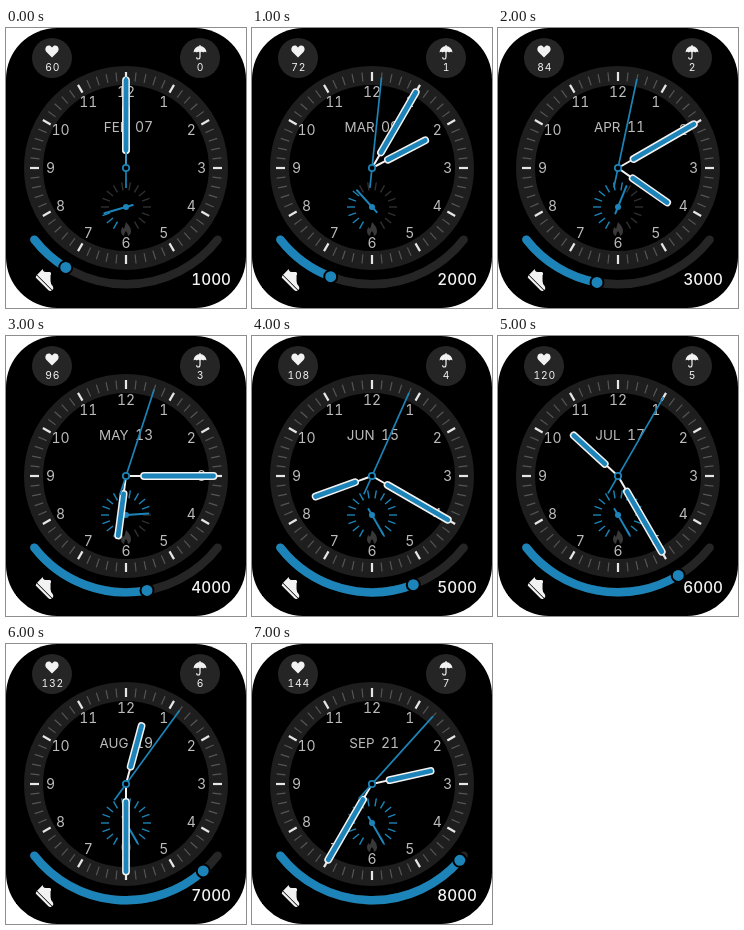
Animation of 240 by 280 pixels, one loop 8 s. Source, as an HTML page:

```html
<!DOCTYPE html>
<html lang="en">
<head>
<meta charset="utf-8">
<title>Watch face</title>
<style>
  html, body { margin: 0; width: 100%; height: 100%; overflow: hidden; background: #fff; }
  svg { display: block; width: 100vw; height: 100vh; }
  text { font-family: Inter, Roboto, sans-serif; font-variant-numeric: tabular-nums; }
  .mid { text-anchor: middle; }
  .end { text-anchor: end; }
  .bold { font-weight: 500; }
  .round { stroke-linecap: round; }
</style>
</head>
<body>
<svg id="face" viewBox="0 0 240 280"></svg>
<script>
const BLUE = '#1c84b8', GREY = '#252525', LIGHT = '#f2f2f2', TEXT = '#bcbcbc';
const MONTHS = ['FEB', 'MAR', 'APR', 'MAY', 'JUN', 'JUL', 'AUG', 'SEP'];
const STEP = 1000, CX = 120, CY = 140, SUB_Y = 179, ARC_R = 116.3;
const TICK_GAP = 20;
const face = document.getElementById('face');

function add(tag, attrs, parent = face) {
  const el = document.createElementNS('http://www.w3.org/2000/svg', tag);
  for (const name in attrs) el.setAttribute(name, attrs[name]);
  parent.appendChild(el);
  return el;
}

function label(x, y, size, fill, cls, content = '') {
  const el = add('text', { x, y, 'font-size': size, fill, class: cls });
  el.textContent = content;
  return el;
}

// Clockwise angle in degrees, zero at twelve o'clock
function polar(angle, r, cy = CY) {
  const a = angle * Math.PI / 180;
  return [CX + r * Math.sin(a), cy - r * Math.cos(a)];
}

function spoke(angle, from, to, cy, stroke, width, parent = face) {
  const [x1, y1] = polar(angle, from, cy), [x2, y2] = polar(angle, to, cy);
  return add('line', { x1, y1, x2, y2, stroke, 'stroke-width': width }, parent);
}

function hand(length) {
  const group = add('g', { class: 'round' });
  spoke(0, 0, 18, CY, LIGHT, 2, group);
  spoke(0, 18, length, CY, LIGHT, 7.8, group);
  spoke(0, 18, length, CY, BLUE, 4.8, group);
  return group;
}

function arcPath(from, to) {
  return `M${polar(from, ARC_R)}A${ARC_R} ${ARC_R} 0 0 0 ${polar(to, ARC_R)}`;
}

function turn(el, angle, cy = CY) {
  el.setAttribute('transform', `rotate(${angle} ${CX} ${cy})`);
}

add('rect', { width: 240, height: 280, rx: 51 });

// Dial
add('circle', { cx: CX, cy: CY, r: 92.5, fill: 'none', stroke: '#1e1e1e', 'stroke-width': 19 });
for (let i = 0; i < 60; i++) {
  const major = i % 5 === 0;
  spoke(i * 6, 87, 96, CY, major ? '#e6e6e6' : '#555', major ? 2.2 : 1.2);
}
for (let h = 1; h <= 12; h++) {
  const [x, y] = polar(h * 30, 75.5);
  label(x, y + 4.8, 14, TEXT, 'mid', h);
}
const month = label(122.5, 104.3, 13.4, TEXT, 'end');
const day = label(129, 104.3, 14, TEXT, '');

// Heart rate and rain
for (const cx of [46, 194]) add('circle', { cx, cy: 30, r: 20, fill: GREY });
add('path', { d: 'M46 29.5L40.5 24C37.5 20.5 41 16 44.5 18L46 19.5L47.5 18C51 16 54.5 20.5 51.5 24Z', fill: LIGHT });
add('path', { d: 'M187.5 24.5a6.5 6.5 0 0 1 13 0q-1.6-1.500-3.200 0q-1.6-1.500-3.300 0q-1.7-1.500-3.300 0q-1.6-1.500-3.200 0z', fill: LIGHT });
add('path', { d: 'M194 17v12q0 2-1.7 2t-1.6-1.7', fill: 'none', stroke: LIGHT, 'stroke-width': 1.2 });
const pulse = label(46.7, 42.8, 10.3, LIGHT, 'mid');
pulse.setAttribute('letter-spacing', 0.8);
const rain = label(194, 42.8, 10.3, LIGHT, 'mid');

// Calories
const ticks = [];
for (let a = 0; a <= 300; a += TICK_GAP) ticks.push(spoke(210 + a, 17, 25, SUB_Y, GREY, 1.4));
add('path', { d: 'M120 194q5 5 5 9q0 4-3 5q0-3-2-5q-2 2-2 5q-3-1-3-5q0-2 1.5-4l1.5 2q1-3 2-7z', fill: '#383838' });
const calorieHand = add('g', { class: 'round' });
spoke(0, -7, 22.5, SUB_Y, BLUE, 2, calorieHand);
add('circle', { cx: CX, cy: SUB_Y, r: 3, fill: BLUE });

// Steps
const arcStyle = { fill: 'none', 'stroke-width': 8.4, class: 'round' };
add('path', { ...arcStyle, d: arcPath(232, 128), stroke: GREY });
const stepArc = add('path', { ...arcStyle, stroke: BLUE });
const knob = add('circle', { r: 6.5, fill: BLUE, stroke: '#000', 'stroke-width': 2 });
add('path', {
  d: 'M-10-4Q-8-2-6-4L-3-7Q-1-8 0-5L4-1Q6 1 9 1Q12 2 11.5 4H-10ZM-10 4.8H11.5Q11 7 9 7H-9Z',
  transform: 'translate(41 251) rotate(45)', fill: LIGHT
});
const steps = label(225, 256.8, 15.3, LIGHT, 'end bold');

// Hands
const hourHand = hand(60);
const minuteHand = hand(87.5);
const secondHand = add('g', {});
spoke(0, -20, 91, CY, BLUE, 1.7, secondHand);
add('circle', { cx: CX, cy: CY, r: 3.2, fill: '#000', stroke: BLUE, 'stroke-width': 1.7 });

function draw(k) {
  month.textContent = MONTHS[k];
  day.textContent = String(7 + 2 * k).padStart(2, '0');
  pulse.textContent = 60 + 12 * k;
  rain.textContent = k;
  steps.textContent = 1000 * (k + 1);

  turn(hourHand, 62.5 * k);
  turn(minuteHand, 30 * k);
  turn(secondHand, 6 * k);

  const burn = Math.min(300, 44 + 64 * k);
  turn(calorieHand, 210 + burn, SUB_Y);
  ticks.forEach((tick, i) => tick.setAttribute('stroke', i * TICK_GAP <= burn ? BLUE : '#303030'));

  // The step gauge advances in ten levels
  const level = Math.min(10, Math.floor((k + 1) * 10 / 8) + 1);
  const angle = Math.max(131, 232 - 10.4 * level);
  const [cx, cy] = polar(angle, ARC_R);
  stepArc.setAttribute('d', arcPath(232, angle));
  knob.setAttribute('cx', cx);
  knob.setAttribute('cy', cy);
}

const start = performance.now();
function loop() {
  draw(Math.floor((performance.now() - start) / STEP) % MONTHS.length);
  requestAnimationFrame(loop);
}
loop();
</script>
</body>
</html>
```
